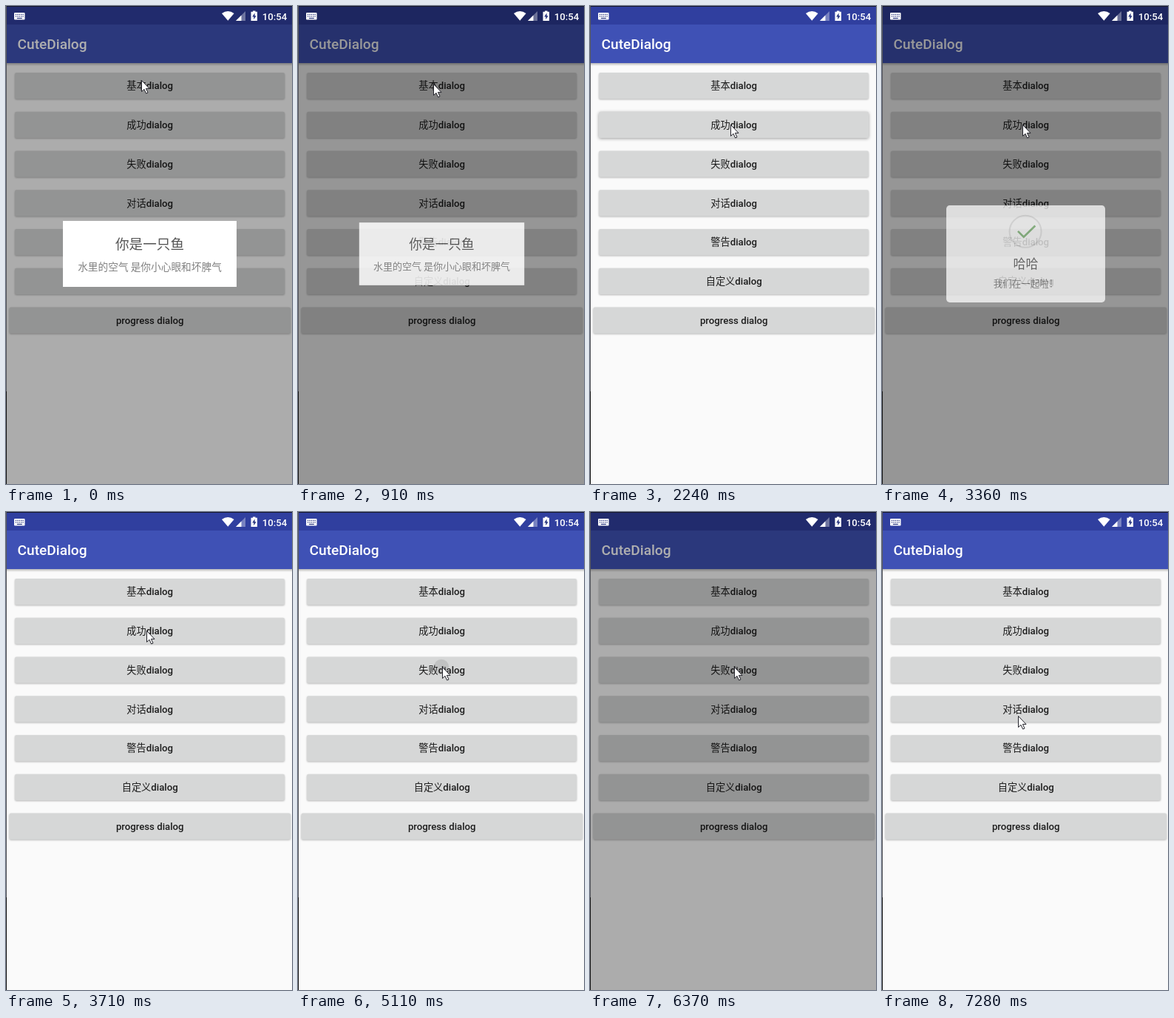
These frames come from a looping animation (387x645 px, 8000 ms). An HTML page:

```html
<!DOCTYPE html>
<html lang="zh-CN">
<head>
<meta charset="utf-8">
<style>
html, body { margin: 0; width: 100%; height: 100%; overflow: hidden; }
svg { display: block; width: 100vw; height: 100vh; }
text { font-family: Roboto, "Noto Sans CJK SC", "Noto Sans CJK", sans-serif; font-size: 13.2px; font-weight: 500; }
.zh { font-family: "Noto Sans CJK SC", "Noto Sans CJK", sans-serif; font-weight: 400; }
.mid { text-anchor: middle; }
.label { fill: #1c1c1c; }
.title { font-size: 18.6px; fill: #555; }
.body { font-size: 13.7px; fill: #808080; }
</style>
</head>
<body>
<svg viewBox="0 0 387 645" preserveAspectRatio="none">
  <defs>
    <linearGradient id="shade" x2="0" y2="1">
      <stop stop-opacity=".26"/><stop offset="1" stop-opacity="0"/>
    </linearGradient>
  </defs>
  <rect width="387" height="645" fill="#fafafa"/>
  <rect width="387" height="25" fill="#303f9f"/>
  <rect y="25" width="387" height="52" fill="#3f51b5"/>
  <rect y="77" width="387" height="4" fill="url(#shade)"/>
  <text x="15.6" y="58.3" style="font-size:19.1px" fill="#fff">CuteDialog</text>
  <g id="buttons"></g>
  <rect id="dim" x="1" y="1" width="386" height="644"/>
  <path d="M0 .5H387" stroke="#15172a"/>
  <path d="M.5 0V520" stroke="#55565c"/>
  <path d="M.5 520V645" stroke="#111"/>
  <g fill="#fff">
    <rect x="11" y="9" width="14.5" height="9.5" rx="1"/>
    <path d="M12.8 11.4H24M12.8 13.8H24" stroke="#28357f" stroke-width="1.3" stroke-dasharray="1.3 1.1"/>
    <path d="M14.8 16.5H21.8" stroke="#28357f" stroke-width="1.2"/>
    <path d="M292 10Q300.3 4 308.6 10L300.3 19.8Z"/>
    <path d="M324 7V20H311Z" opacity=".35"/>
    <path d="M318.5 12.5V20H311Z"/>
    <path d="M334 6.5H337.5V7.8H340V20H331.5V7.8H334Z"/>
    <path d="M336.6 9.5L333.2 14.6H335.3V18.2L338.6 13.2H336.6Z" fill="#28357f"/>
    <text x="346.8" y="18.7">10:54</text>
  </g>
  <g id="dialogs"></g>
  <path id="cursor" d="M.5 .5V15.5L4 12.3L6.6 18L9 17L6.4 11.4H11Z" fill="#fff" stroke="#24242c" stroke-linejoin="round"/>
</svg>
<script>
const $ = id => document.getElementById(id);
const clamp = v => Math.max(0, Math.min(1, v));
const progress = (t, start, length) => clamp((t - start) / length);

const LOOP = 8000, STEP = 70, DIM = 0.4, PITCH = 52.75;
const CX = 194.5, CY = 334.5;

// Buttons
const labels = ['基本', '成功', '失败', '对话', '警告', '自定义', ''];
$('buttons').innerHTML = labels.map((zh, i) => {
  const y = 90 + i * PITCH, wide = !zh;
  const x = wide ? 4.5 : 12, w = wide ? 380.5 : 365;
  return `<clipPath id="clip${i}"><rect x="${x}" y="${y}" width="${w}" height="35.3" rx="2"/></clipPath>
    <rect id="button${i}" x="${x}" y="${y}" width="${w}" height="35.3" rx="2" fill="#d6d7d7"/>
    <g clip-path="url(#clip${i})"><circle id="ripple${i}" r="0"/></g>
    <text class="mid label" x="194.7" y="${y + 22.4}"><tspan class="zh">${zh}</tspan>${wide ? 'progress ' : ''}dialog</text>`;
}).join('');

// Dialogs
const box = (h, r) =>
  `<rect x="77" y="${CY - h / 2}" width="235" height="${h}" rx="${r}" fill="#fff"/>`;
const words = (title, titleY, body, bodyY) =>
  `<text class="zh mid title" x="${CX}" y="${titleY}">${title}</text>
   <text class="zh mid body" x="${CX}" y="${bodyY}">${body}</text>`;
const badge = (mark, color) =>
  `<circle cx="194" cy="301.5" r="23.5" fill="none" stroke="#e4e4e4" stroke-width="2.2"/>
   <path d="${mark}" fill="none" stroke="${color}" stroke-width="3"/>`;

const dialogs = [
  { open: -160, close: 887,
    art: box(89, 0) + words('你是一只鱼', 327.6, '水里的空气 是你小心眼和坏脾气', 357) },
  { open: 2360, close: 3320,
    art: box(143, 5) + badge('M183 301L191.5 309.5L208.5 293', '#80b678') +
      words('哈哈', 355.5, '我们在一起啦！', 383.2) },
  { open: 5230, close: 6161,
    art: box(143, 5) + badge('M185 292.5L203 310.5M203 292.5L185 310.5', '#d9685f') +
      words('呜呜', 355.5, '我们不在一起！', 383.2) }
];
$('dialogs').innerHTML = dialogs.map((d, i) => `<g id="dialog${i}">${d.art}</g>`).join('');

const presses = [
  { button: 1, x: 190, y: 160, lift: 2200, ripple: 2250 },
  { button: 2, x: 194, y: 209, lift: 5130, ripple: 5100 }
];

// Pointer stops: start, length, x, y
const moves = [
  [419, 1, 183, 105], [1200, 410, 190, 160],
  [3790, 340, 195, 209], [6870, 410, 184, 275]
];

function drawDialog(d, i, t) {
  const enter = progress(t, d.open, 150), leave = progress(t, d.close, 150);
  const scale = (0.9 + 0.1 * enter) * (1 - 0.32 * leave);
  const g = $('dialog' + i);
  g.setAttribute('opacity', enter * (1 - leave));
  g.setAttribute('transform', `translate(${CX} ${CY}) scale(${scale}) translate(${-CX} ${-CY})`);
  const rise = progress(t, d.open, 300), fall = progress(t, d.close + 170, 180);
  return DIM * (1 - (1 - rise) ** 2) * (1 - fall);
}

function drawPress(p, t) {
  const u = progress(t, p.ripple, 350), c = $('ripple' + p.button);
  c.setAttribute('cx', p.x);
  c.setAttribute('cy', p.y);
  c.setAttribute('r', t < p.ripple ? 0 : 10 + 180 * u * u);
  c.setAttribute('opacity', 0.1 * (1 - u));
  return t > p.lift && t < p.lift + 400 ? p.button : -1;
}

function drawPointer(t) {
  let x = 183, y = 100;
  for (const [start, length, nx, ny] of moves) {
    const u = progress(t, start, length), e = u * u * (3 - 2 * u);
    x += (nx - x) * e;
    y += (ny - y) * e;
  }
  $('cursor').setAttribute('transform', `translate(${x} ${y})`);
}

function draw(now) {
  const t = Math.min(Math.floor((now % LOOP) / STEP) * STEP, 7280);
  const dims = dialogs.map((d, i) => drawDialog(d, i, t));
  $('dim').setAttribute('opacity', Math.max(...dims));
  const lifted = presses.map(p => drawPress(p, t));
  labels.forEach((_, i) => {
    $('button' + i).style.filter = lifted.includes(i)
      ? 'drop-shadow(0 1.5px 2px rgba(0,0,0,.38))'
      : 'drop-shadow(0 1px 1px rgba(0,0,0,.27))';
  });
  drawPointer(t);
}

let begin;
function tick(now) {
  begin ??= now;
  draw(now - begin);
  requestAnimationFrame(tick);
}
draw(0);
requestAnimationFrame(tick);
</script>
</body>
</html>
```
